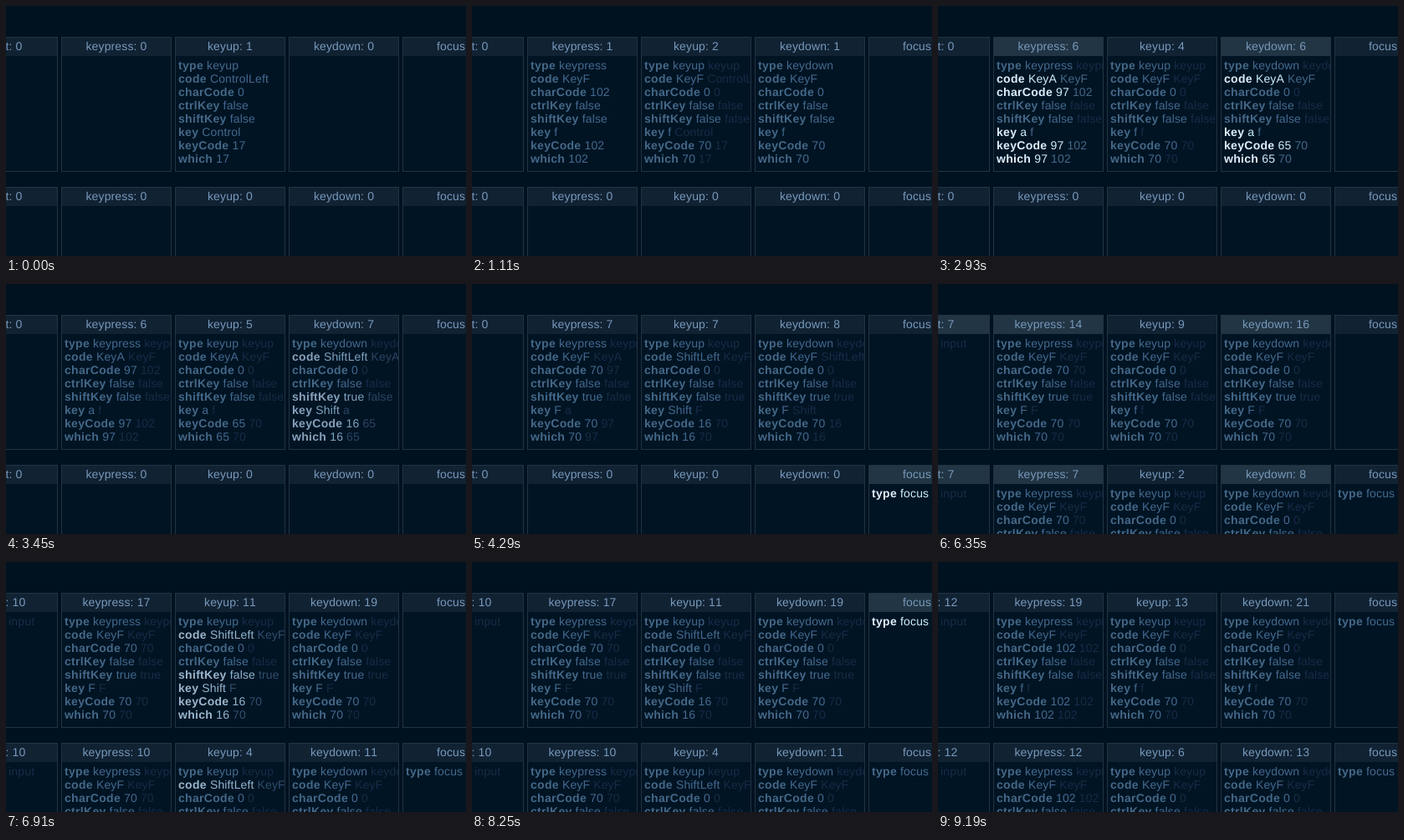
These frames come from a looping animation (550 by 300 pixels, 9460 ms). An HTML page:

```html
<!DOCTYPE html>
<html lang="en">
<head>
<meta charset="utf-8">
<title>Keyboard event log</title>
<style>
  html, body { margin: 0; width: 100%; height: 100%; overflow: hidden; background: #001120; }
  #stage {
    position: relative; width: 550px; height: 300px; overflow: hidden;
    font: 14px/16px "Liberation Sans", Arial, sans-serif;
    font-kerning: none; text-rendering: geometricPrecision;
    letter-spacing: .14px; white-space: pre;
  }
  .cell {
    position: absolute; box-sizing: border-box; width: 132px; height: 162px;
    overflow: hidden; border: 1px solid #223344; background: #011423;
  }
  .head {
    height: 20px; line-height: 20px; padding-bottom: 2px; text-align: center; color: #7799bb;
    background: color-mix(in srgb, #223544 var(--glow, 0%), #112233);
  }
  .body { padding: 3px; }
  .line { height: 16px; }
  .line b { letter-spacing: .3px; color: color-mix(in srgb, #ddeeff var(--glow, 0%), #446888); }
  .now { color: color-mix(in srgb, #cceeff var(--glow, 0%), #446a90); }
  .old { color: color-mix(in srgb, #446888 var(--glow, 0%), #182b48); }
</style>
</head>
<body>
<div id="stage"></div>
<script>
const LOOP = 9460, STEP = 40, TEXT_FADE = 280, HEAD_FADE = 120;
const KINDS = ['input', 'keypress', 'keyup', 'keydown', 'focus'];
const FIELDS = ['type', 'code', 'charCode', 'ctrlKey', 'shiftKey', 'key', 'keyCode', 'which'];
const FIELD_FOCUS = 4290, PAGE_FOCUS = 8250;
const stage = document.getElementById('stage');

const logs = [0, 1].map(() => Object.fromEntries(KINDS.map(k => [k, []])));

function add(time, type, key, shift) {
  const event = { time, type };
  if (key) {
    const letter = key.length === 1;
    const charCode = type === 'keypress' ? key.charCodeAt(0) : 0;
    const keyCode = charCode || (letter ? key.toUpperCase().charCodeAt(0) : { Shift: 16, Control: 17 }[key]);
    Object.assign(event, {
      code: letter ? 'Key' + key.toUpperCase() : key + 'Left',
      charCode, ctrlKey: false, shiftKey: shift, key, keyCode, which: keyCode
    });
  }
  logs[0][type].push(event);
  if (time > FIELD_FOCUS) logs[1][type].push(event);
}

const isUpper = key => key === 'F';

function down(key, ...times) {
  for (const time of times) {
    const shift = isUpper(key) || key === 'Shift';
    add(time, 'keydown', key, shift);
    if (key.length > 1) continue;
    add(time, 'keypress', key, shift);
    if (time > FIELD_FOCUS) add(time, 'input');
  }
}

const up = (key, time) => add(time, 'keyup', key, isUpper(key));

up('Control', -1000);
down('f', 750);                     up('f', 830);
down('f', 1880);                    up('f', 1920);
down('f', 2450, 2530, 2610);        up('f', 2650);
down('a', 2930);                    up('a', 3050);
down('Shift', 3290);
down('F', 3530);                    up('F', 3770);
up('Shift', 4010);
logs[1].focus.push({ time: FIELD_FOCUS, type: 'focus' });
down('f', 4740);                    up('f', 4820);
down('f', 5100, 5340, 5420, 5500);  up('f', 5700);
down('Shift', 6230);
down('F', 6270, 6350, 6430, 6510, 6590);
up('F', 6670);
up('Shift', 6790);
logs[0].focus.push({ time: PAGE_FOCUS, type: 'focus' });
down('f', 8530);                    up('f', 8610);
down('f', 8810);                    up('f', 8910);

function make(tag, parent, className = '') {
  const el = document.createElement(tag);
  el.className = className;
  return parent.appendChild(el);
}

const cells = logs.flatMap((log, row) => KINDS.map((kind, col) => {
  const box = make('div', stage, 'cell');
  box.style.left = -70 + 136 * col + 'px';
  box.style.top = 37 + 180 * row + 'px';
  return { kind, events: log[kind], head: make('div', box, 'head'), body: make('div', box, 'body'), count: -1 };
}));

function fill(cell, count) {
  const last = cell.events[count - 1], before = cell.events[count - 2];
  cell.count = count;
  cell.head.textContent = `${cell.kind}: ${count}`;
  cell.body.textContent = '';
  cell.changed = [];
  if (!last) return;
  for (const field of FIELDS.filter(f => f in last)) {
    const line = make('div', cell.body, 'line');
    make('b', line).textContent = field;
    make('span', line, 'now').textContent = ' ' + last[field];
    if (before) make('span', line, 'old').textContent = ' ' + before[field];
    if (!before || before[field] !== last[field]) cell.changed.push(line);
  }
}

const glow = (el, age, span) =>
  el.style.setProperty('--glow', 100 * Math.max(0, 1 - age / span) + '%');

function render(time) {
  for (const cell of cells) {
    const count = cell.events.filter(e => e.time <= time).length;
    if (count !== cell.count) fill(cell, count);
    const last = cell.events[count - 1];
    const age = last ? Math.floor((time - last.time) / STEP) * STEP : LOOP;
    glow(cell.head, age, HEAD_FADE);
    for (const line of cell.changed) glow(line, age, TEXT_FADE);
  }
}

const start = performance.now();
function tick() {
  render((performance.now() - start + 4) % LOOP);
  requestAnimationFrame(tick);
}
tick();
</script>
</body>
</html>
```
